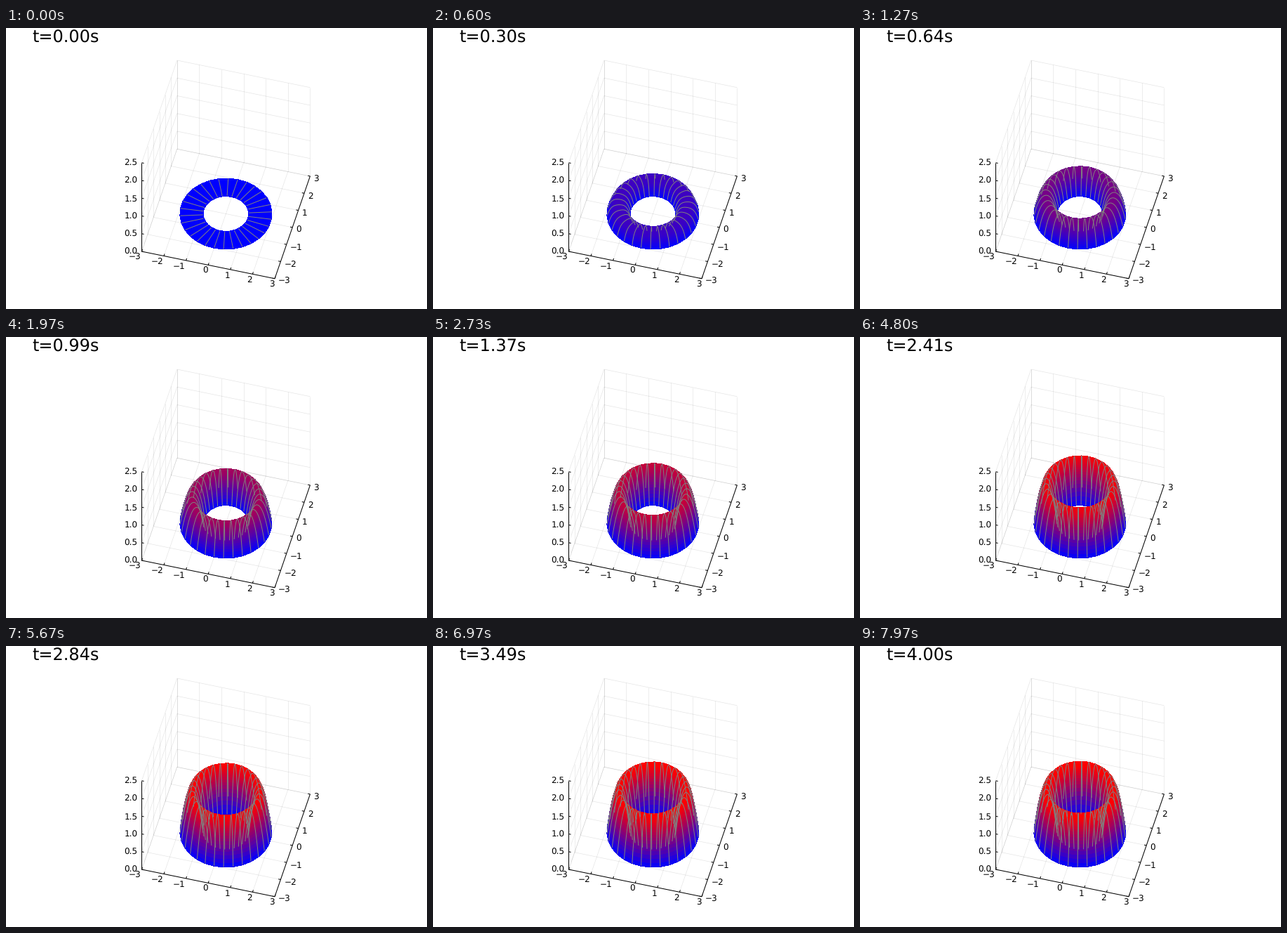
These frames come from a looping animation (600x400 px, 8 s). A matplotlib script:

```python
import numpy as np
import matplotlib.pyplot as plt
from matplotlib.animation import FuncAnimation
from matplotlib.collections import LineCollection, PolyCollection

W, H, DPI = 600, 400, 100
PX = 72 / DPI                        # points per pixel
LOOP, STEP = 8000, 20                # ms
DT = 5 / 299                         # simulated seconds per picture
KAPPA, SOURCE, Z_HOT = 0.1, 1.0, 1.2
NR, NA = 40, 30                      # radial and angular cells

plt.rcParams["font.family"] = "DejaVu Sans"
plt.rcParams["text.hinting"] = "none"


def project(x, y, z):
    """Orthographic view of the box, in stage pixels."""
    px = 313.4 + 31.6 * x + 8.4 * y + 0 * z
    py = 264.5 + 6.45 * x - 24.3 * y - 50.5 * z
    return np.stack(np.broadcast_arrays(px, py), axis=-1)


# Heat equation on the ring 1 < r < 2 with cold rims and a constant source.
r = np.linspace(1, 2, NR + 1)
h = r[1] - r[0]
ri = r[1:-1]
lap = (np.diag(np.full(NR - 1, -2 / h**2))
       + np.diag((1 / h**2 + 1 / (2 * h * ri))[:-1], 1)
       + np.diag((1 / h**2 - 1 / (2 * h * ri))[1:], -1))
lam, modes = np.linalg.eig(lap)
lam, modes = KAPPA * lam.real, modes.real
weights = np.linalg.solve(modes, np.full(NR - 1, SOURCE))


def profile(t):
    u = np.zeros(NR + 1)
    u[1:-1] = modes @ (weights * np.expm1(lam * t) / lam)
    return u


theta = np.linspace(0, 2 * np.pi, NA + 1)
X = np.sin(theta)[:, None] * r
Y = np.cos(theta)[:, None] * r

fig = plt.figure(figsize=(W / DPI, H / DPI), dpi=DPI, facecolor="white")
ax = fig.add_axes([0, 0, 1, 1])
ax.set_xlim(0, W)
ax.set_ylim(H, 0)
ax.axis("off")


def add_lines(segments, color, width, z):
    lines = LineCollection(segments, colors=color, linewidths=width * PX, zorder=z)
    ax.add_collection(lines)
    return lines


def seg(a, b):
    return [project(*a), project(*b)]


def label(x, y, text, ha):
    ax.text(x, y + 4.4, text, fontsize=12 * PX, ha=ha, va="baseline")


ticks = range(-3, 4)
levels = np.arange(0, 2.6, 0.5)

grid = []
for k in ticks:
    grid += [seg((k, -3, 0), (k, 3, 0)), seg((k, 3, 0), (k, 3, 2.5)),
             seg((-3, k, 0), (3, k, 0)), seg((-3, k, 0), (-3, k, 2.5))]
for v in levels:
    grid += [seg((-3, -3, v), (-3, 3, v)), seg((-3, 3, v), (3, 3, v))]
add_lines(grid, (0, 0, 0, 0.1), 0.7, 1)

frame = [seg((-3, -3, 0), (3, -3, 0)), seg((3, -3, 0), (3, 3, 0)),
         seg((-3, -3, 0), (-3, -3, 2.5))]
for k in ticks:
    frame += [seg((k, -3, 0), (k, -2.88, 0)), seg((3, k, 0), (2.9, k, 0))]
    name = str(k).replace("-", "−")
    x, y = project(k, -3, 0)
    label(x - 0.7, y + 7.3, name, "right")
    x, y = project(3, k, 0)
    label(x + 5, y + 3, name, "left")
for v in levels:
    frame.append(seg((-3, -3, v), (-2.9, -3, v)))
    x, y = project(-3, -3, v)
    label(x - 5.9, y - 0.3, f"{v:.1f}", "right")
add_lines(frame, "black", 1, 2)

surface = PolyCollection([], antialiaseds=False, linewidths=0.4 * PX,
                         joinstyle="bevel", zorder=3)
ax.add_collection(surface)
spokes = add_lines([], "#808080", 1, 4)
clock = ax.text(37.5, 21, "", fontsize=24 * PX, ha="left", va="baseline")


def corners(a):
    return np.stack([a[:-1, :-1], a[1:, :-1], a[1:, 1:], a[:-1, 1:]], axis=2)


def draw(k):
    ms = k * STEP + STEP / 2
    t = int((ms + 5) * 0.03) * DT
    Z = np.tile(profile(t), (NA + 1, 1))
    pts = project(X, Y, Z)

    quads = corners(pts).reshape(-1, 4, 2)
    zm = corners(Z).mean(axis=2).ravel()
    near = corners(6.45 * X - 24.3 * Y).mean(axis=2).ravel()
    order = np.argsort(0.83 * near + 60 * zm)

    heat = np.clip(zm[order] / Z_HOT, 0, 1)
    rgb = np.stack([heat, 0 * heat, 1 - heat], axis=1)
    surface.set_verts(quads[order])
    surface.set_facecolor(rgb)
    surface.set_edgecolor(rgb)
    spokes.set_segments(pts[:-1])
    clock.set_text(f"t={t:.2f}s")
    return surface, spokes, clock


anim = FuncAnimation(fig, draw, frames=LOOP // STEP, interval=STEP,
                     repeat=True, repeat_delay=0, blit=False)
plt.show()
```
